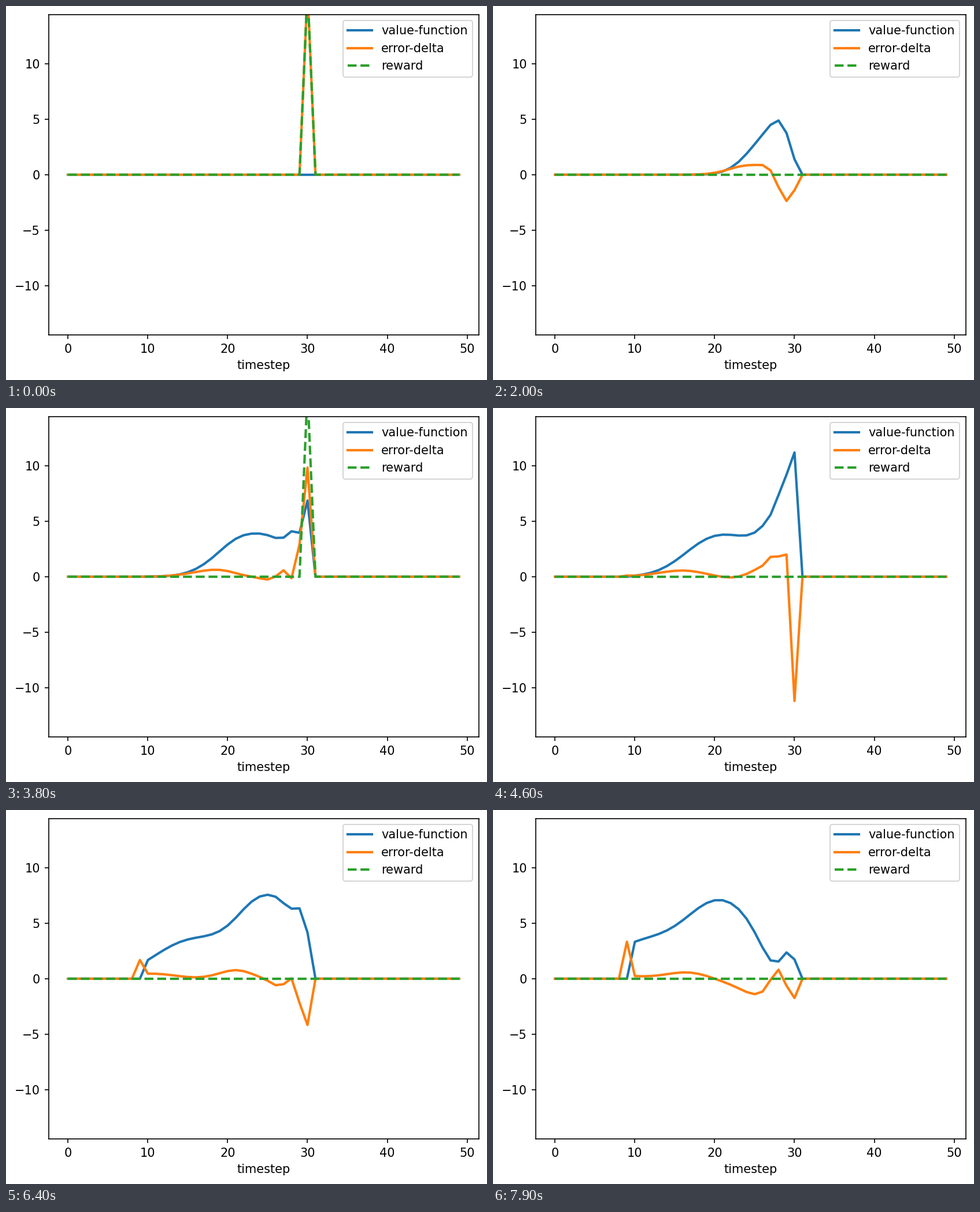
These frames come from a looping animation (832x647 px, 8 s). A matplotlib script:

```python
import numpy as np
import matplotlib.pyplot as plt
from matplotlib.animation import FuncAnimation

W, H, DPI = 832, 647, 150
TRIALS, STEPS = 80, 50
CUE, GOAL = 10, 30
RATE, PROB, MEAN = 0.3, 0.3, 5
REWARDED = {0, 5, 8, 12, 14, 22, 23, 31, 33, 37, 38, 41, 42, 43,
            45, 49, 51, 52, 55, 59, 61, 75}


def learn():
    """Run TD(0) learning and keep the curves of every trial."""
    value = np.zeros(STEPS + 1)
    history = []
    for trial in range(TRIALS):
        reward = np.zeros(STEPS)
        if trial in REWARDED:
            reward[GOAL] = MEAN / PROB
        delta = reward + value[1:] - value[:-1]
        history.append((value[:-1].copy(), delta, reward))
        # only steps after the cue can be learned
        value[CUE:-1] += RATE * delta[CUE:]
    return history


history = learn()
steps = np.arange(STEPS)

plt.rcParams["font.family"] = "DejaVu Sans"
fig = plt.figure(figsize=((W + 0.001) / DPI, (H + 0.001) / DPI), dpi=DPI,
                 facecolor="white")
ax = fig.add_axes([73.58 / W, 77.92 / H, 744 / W, 554.4 / H])
ax.set_xlim(-2.45, 51.45)
ax.set_ylim(-14.41, 14.41)
ax.set_xticks(range(0, 51, 10))
ax.set_yticks(range(-10, 11, 5))
ax.set_xlabel("timestep")

styles = [("value-function", "C0", "-"),
          ("error-delta", "C1", "-"),
          ("reward", "C2", "--")]
lines = [ax.plot(steps, curve, ls, color=color, lw=2, label=label)[0]
         for curve, (label, color, ls) in zip(history[0], styles)]
ax.legend(loc="upper right")


def update(trial):
    for line, curve in zip(lines, history[trial]):
        line.set_ydata(curve)
    return lines


anim = FuncAnimation(fig, update, frames=TRIALS, interval=100,
                     repeat=True, repeat_delay=0)
plt.show()
```
